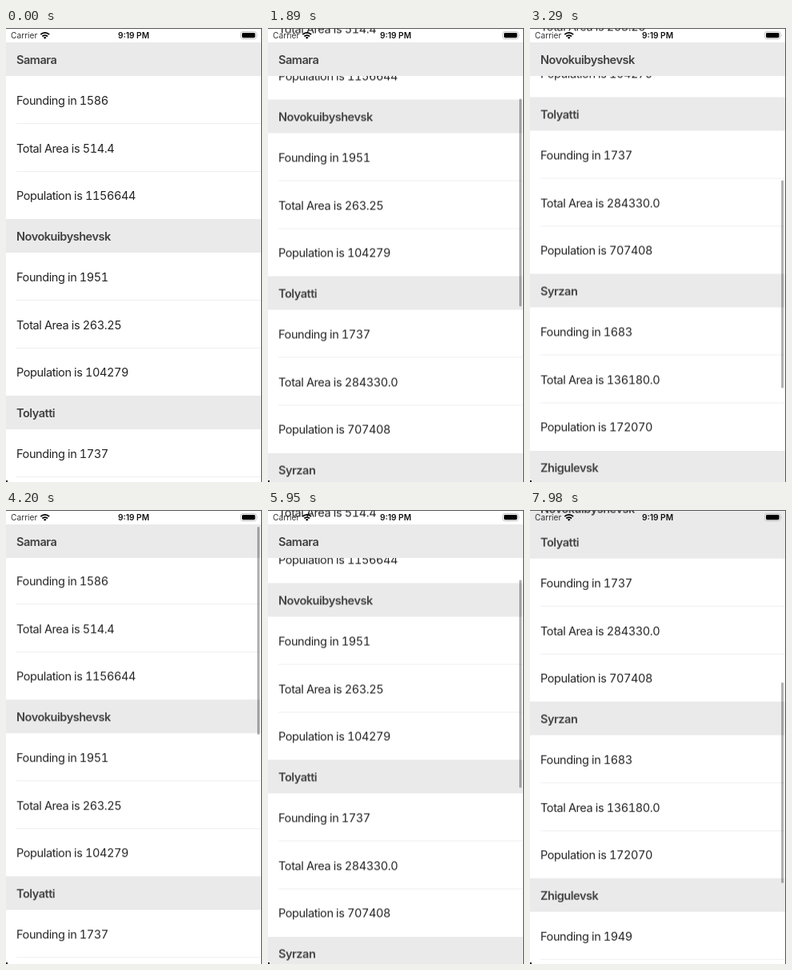
Animation, 320 px wide and 568 px high, one loop 8000 ms. Source, as an HTML page:

```html
<!DOCTYPE html>
<html lang="en">
<head>
<meta charset="utf-8">
<title>City list</title>
<style>
  html, body { margin: 0; width: 100%; height: 100%; overflow: hidden; background: #fff; }
  #stage {
    position: relative; width: 320px; height: 568px; overflow: hidden; background: #fff;
    font: 14.5px Inter, Roboto, "Liberation Sans", sans-serif; color: #222;
    font-variant-numeric: tabular-nums;
  }
  #stage > *, .row { position: absolute; }
  #list { left: 0; top: 0; width: 320px; will-change: transform; }
  .row {
    left: 13px; width: 307px; height: 59.67px; line-height: 61.4px;
    letter-spacing: -0.027em; white-space: pre;
  }
  .line::after {
    content: ""; position: absolute; left: 0; right: 0; bottom: -0.5px;
    height: 1px; background: #eee;
  }
  .head {
    left: 0; top: 0; width: 307px; height: 42px; padding-left: 13px; line-height: 44px;
    background: #eaeaea; color: #404040; font-weight: 600; letter-spacing: -0.032em;
    will-change: transform;
  }
  #bar { left: 314px; top: 0; width: 2.6px; border-radius: 1.3px; background: rgba(0, 0, 0, .3); }
  .status { top: 0; height: 18px; line-height: 19px; font-size: 10.2px; }
  #carrier { left: 6px; color: #333; }
  #clock {
    left: 0; width: 319px; text-align: center; font-weight: 600; color: #111;
    font-variant-numeric: normal;
  }
  #icons { left: 0; top: 0; }
  #frame {
    left: 0; top: 0; width: 319px; height: 567px;
    border: solid #555; border-width: 1px 1px 0 0;
  }
  #corner { left: 0; top: 566px; width: 2px; height: 2px; background: #222; }
</style>
</head>
<body>
<div id="stage">
  <div id="list"></div>
  <div id="bar"></div>
  <div id="carrier" class="status">Carrier</div>
  <div id="clock" class="status">9:19 PM</div>
  <svg id="icons" width="320" height="18" fill="none">
    <g stroke="#000" stroke-width="1.8">
      <path d="M43.3 8.2A7.6 7.6 0 0 1 54.1 8.2"/>
      <path d="M45.4 10.5A4.6 4.6 0 0 1 52 10.5"/>
    </g>
    <path d="M46.9 11.9A2.6 2.6 0 0 1 50.5 11.9L48.7 13.8Z" fill="#000"/>
    <rect x="293.5" y="4.5" width="19.4" height="9.2" rx="2.5" stroke="#c0c0c0" stroke-width=".9"/>
    <rect x="295" y="6" width="16.4" height="6.2" rx="1.4" fill="#000"/>
    <path d="M314 7.5Q315.4 9.1 314 10.7Z" fill="#c0c0c0"/>
  </svg>
  <div id="frame"></div>
  <div id="corner"></div>
</div>
<script>
const LOOP = 8000, STEP = 70;
const TOP = 18, HEAD = 42, ROW = 59.67, SECTION = 221;

const cities = [
  ["Samara", "1586", "514.4", "1156644"],
  ["Novokuibyshevsk", "1951", "263.25", "104279"],
  ["Tolyatti", "1737", "284330.0", "707408"],
  ["Syrzan", "1683", "136180.0", "172070"],
  ["Zhigulevsk", "1949"]
];
const labels = ["Founding in ", "Total Area is ", "Population is "];

const power = p => u => u ** p;
const brake = p => u => 1 - (1 - u) ** p;
const glide = k => u => (1 - Math.exp(-k * u)) / (1 - Math.exp(-k));
const smooth = u => u * u * (3 - 2 * u);

// start ms, end ms, scroll at end, easing
const moves = [
  [1330, 1890, 149.5, power(1.7)],
  [1890, 3290, 373.5, glide(2.8)],
  [3500, 4200, 1.75, smooth],
  [4200, 4690, 0, brake(2)],
  [5320, 5950, 147.5, power(1.7)],
  [5950, 6790, 418.3, brake(1.6)],
  [7770, 7980, 441.3, power(1.3)]
];

const $ = id => document.getElementById(id);
const stage = $("stage"), list = $("list"), bar = $("bar");

function add(parent, cls, text, before = null) {
  const el = document.createElement("div");
  el.className = cls;
  el.textContent = text;
  return parent.insertBefore(el, before);
}

const heads = cities.map(([name, ...values], i) => {
  values.forEach((value, j) => {
    const row = add(list, j < 2 ? "row line" : "row", labels[j] + value);
    row.style.top = TOP + i * SECTION + HEAD + j * ROW + "px";
  });
  return add(stage, "head", name, bar);
});

function scrollAt(t) {
  let pos = 0;
  for (const [start, end, to, ease] of moves) {
    if (t < start) break;
    pos += (to - pos) * ease(Math.min(1, (t - start) / (end - start)));
  }
  return pos;
}

function barOpacity(t) {
  if (t < 1400) return 0;
  if (t >= 5390) return 1;
  return Math.max(0, Math.min(1, (4690 - t) / 350));
}

const moveY = (el, y) => { el.style.transform = `translateY(${y.toFixed(2)}px)`; };

function draw(t) {
  const pos = scrollAt(t);
  moveY(list, -pos);

  // Headers stick below the status bar until the next one pushes them out.
  heads.forEach((head, i) => {
    const y = TOP + i * SECTION - pos;
    moveY(head, Math.max(y, Math.min(TOP, y + SECTION - HEAD)));
  });

  // The bar shrinks once the last section's rows count towards the height.
  const deep = pos > 376;
  moveY(bar, 20.3 + pos * (deep ? 0.443 : 0.4555));
  bar.style.height = (deep ? 251 : 259.5) + "px";
  bar.style.opacity = barOpacity(t);
}

const begin = performance.now();
function tick() {
  const t = (performance.now() - begin) % LOOP;
  draw(Math.floor(t / STEP) * STEP);
  requestAnimationFrame(tick);
}
draw(0);
requestAnimationFrame(tick);
</script>
</body>
</html>
```
